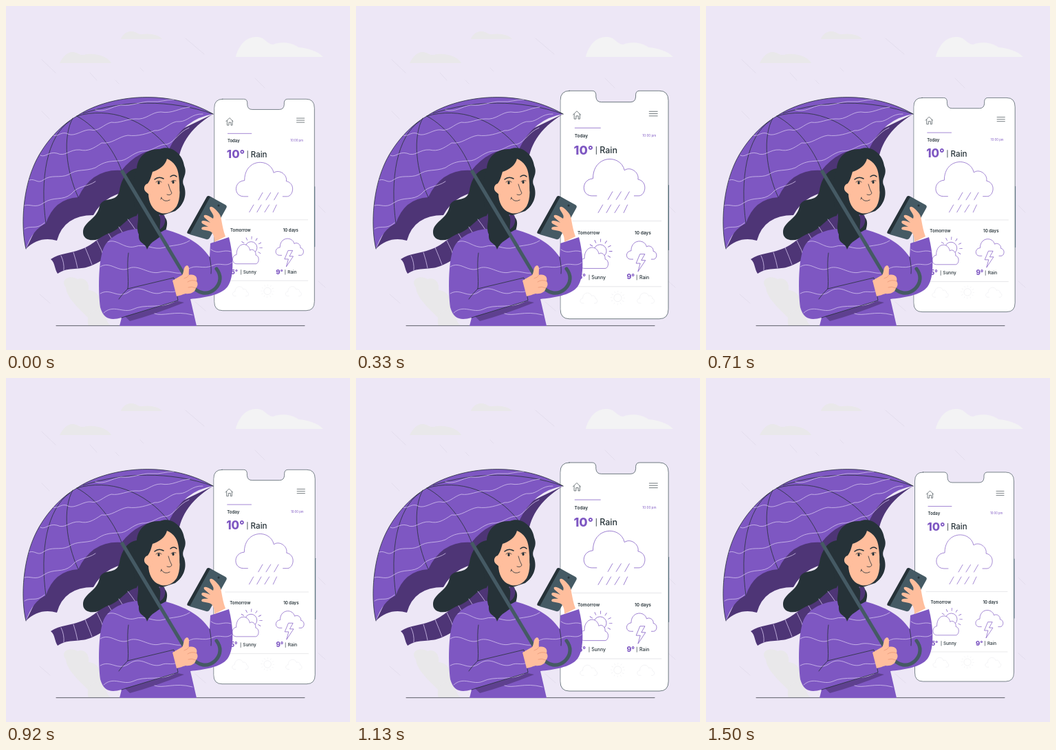
Animation of 500 by 500 pixels, one loop 1.54 s. Source, as an HTML page:

```html
<!DOCTYPE html>
<html lang="en">
<head>
<meta charset="utf-8">
<title>Rain forecast</title>
<style>
  html, body { margin: 0; width: 100%; height: 100%; overflow: hidden; background: #ede7f6; }
  svg { display: block; width: 100vw; height: 100vh; }
  path, line { stroke-linecap: round; stroke-linejoin: round; }
  text { font-family: Inter, "Open Sans", sans-serif; fill: #263238; }
  .p { fill: #7e57c2; }
  .d { fill: #4e3576; }
  .ink { fill: #263238; }
  .skin { fill: #ffbe9d; }
  .line { fill: none; stroke: #263238; stroke-width: .8; }
  .wave { fill: none; stroke: #d3c3ee; stroke-width: .8; }
  .thin { fill: none; stroke: #7e57c2; stroke-width: .7; }
  .pole { fill: none; stroke: #455a64; stroke-width: 5.2; }
  .b { font-weight: 600; font-size: 6px; }
  .num { font-weight: 800; fill: #7e57c2; }
  #app {
    transform-origin: 375.5px 289px;
    animation: beat 1540ms linear infinite;
  }
  @keyframes beat {
    0% { transform: scale(1.011); }
    17.9% { transform: scale(1.1); }
    54.9% { transform: scale(1); }
    75% { transform: scale(1.1); }
    97.4% { transform: scale(1); }
    100% { transform: scale(1.011); }
  }
</style>
</head>
<body>
<svg viewBox="0 0 500 500">
  <defs>
    <path id="cloud" d="M17 47H11C-4 47-4 25 12 24C12-8 49-9 54 13C62 7 74 16 72 25C86 28 82 47 73 47H67"/>
    <g id="sun">
      <circle r="8.5"/>
      <circle r="14" stroke-width="4.4" stroke-dasharray=".7 6.63"/>
    </g>
  </defs>

  <!-- sky -->
  <path fill="#f3f3f4" d="M334 74C337 59 349 44 364 45C377 45 378 55 388 56C400 51 416 53 425 60C438 61 454 66 461 74Z"/>
  <g fill="#e9e8ea">
    <path d="M78 83C82 75 88 67 97 67C104 67 106 72 113 71C126 67 148 72 153 83Z"/>
    <path d="M167 48C169 42 175 36 183 37C190 37 191 42 198 41C209 39 223 42 227 48Z"/>
    <path d="M130 465C118 449 88 428 87 409C78 398 92 390 104 397C116 392 122 405 120 413C132 414 139 424 137 434L150 465Z"/>
    <path d="M120 465C116 452 122 440 134 443L152 465Z"/>
  </g>
  <path fill="none" stroke="#dfd9e8" stroke-width=".7" d="M261 47L288 70M52 78L72 97M122 97L132 108M362 105L376 119M195 90L200 95M52 153L63 164M454 290L464 300M454 400L464 409M49 419L64 432M275 430L290 443M159 108L164 113"/>

  <!-- forecast app -->
  <g id="app">
    <path fill="#fff" stroke="#37474f" stroke-width=".65" d="M315.5 137H346Q350.500 137 351 142V145Q351.500 152 358 152H397Q403.500 152 404 145V142Q404.500 137 409 137H435.500Q447.500 137 447.500 150V428Q447.500 441 435.500 441H315.500Q303.500 441 303.500 428V150Q303.500 137 315.500 137Z"/>
    <path fill="none" stroke="#546e7a" d="M447.900 263V349"/>
    <path class="line" stroke-width=".6" style="stroke-width:.6" d="M320.500 169L325.500 164L330.500 169M322 168V174.500H324.500V170.500H327.500V174.500H329.500V168M422 164.500H433M422 167.500H433M422 170.500H433"/>
    <path class="thin" d="M323 186.500H357"/>
    <text class="b" x="322.500" y="199">Today</text>
    <text x="413" y="198.500" font-size="4.200" style="fill:#7e57c2">10:00 pm</text>
    <text class="num" x="321.500" y="222" font-size="16.300">10°</text>
    <path class="line" d="M351.500 211.500V221.500"/>
    <text x="356" y="220.500" font-size="11.400" font-weight="500">Rain</text>

    <use href="#cloud" class="thin" x="335" y="230"/>
    <path class="thin" d="M373 271.500L367 282M384.500 271.500L378 282M395.500 271.500L389.500 282M360 289L354 299.500M371 289L365 299.500M382.500 289L376 299.500M393 289L388 299.500"/>
    <path fill="none" stroke="#d9d9dd" stroke-width=".6" d="M320 310.500H438M320 398H438"/>

    <text class="b" x="326.500" y="328">Tomorrow</text>
    <text class="b" x="402.500" y="328">10 days</text>
    <use href="#sun" class="thin" x="356.500" y="350.500"/>
    <g transform="translate(330 347) scale(.46 .57)">
      <use href="#cloud" fill="#fff"/>
      <path class="thin" style="stroke-width:1.300" d="M11 47C-4 47-4 25 12 24C12-8 49-9 54 13C62 7 74 16 72 25C86 28 82 47 73 47Z"/>
    </g>
    <g transform="translate(392 338.500) scale(.49)">
      <use href="#cloud" class="thin" style="stroke-width:1.400"/>
    </g>
    <path class="thin" fill="#fff" style="fill:#fff" d="M409.500 355L404.500 367H410L407 378L417 363H411.500L416 355Z"/>
    <text class="num" x="323" y="388.500" font-size="9.500">15°</text>
    <text class="num" x="392" y="388.500" font-size="9.500">9°</text>
    <path class="line" style="stroke-width:.6" d="M342 382.500V389M405.500 382.500V389"/>
    <text x="345" y="388" font-size="6.300" font-weight="500">Sunny</text>
    <text x="409" y="388" font-size="6.300" font-weight="500">Rain</text>
    <g fill="none" stroke="#ececef">
      <g stroke-width="2"><use href="#cloud" transform="translate(330 407) scale(.28)"/></g>
      <use href="#sun" transform="translate(380 413) scale(.6)"/>
      <g stroke-width="2"><use href="#cloud" transform="translate(406 407) scale(.28)"/></g>
    </g>
  </g>

  <path fill="none" stroke="#777782" stroke-width="1.100" d="M73 464.600H434"/>

  <!-- umbrella -->
  <path class="d" d="M29 353Q48 334 74 341Q84 304 127 304Q142 276 175 270L250 232C251 205 266 178 301 157L170 220L60 290Z"/>
  <path class="p" d="M29 353C22 325 23 273 40 233C53 202 78 174 103 160C144 132 232 117 301 157Q258 164 237 208Q196 204 168 239Q125 236 105 278Q70 280 58 316Q39 324 29 353Z"/>
  <path class="line" d="M29 353C22 325 23 273 40 233C53 202 78 174 103 160C144 132 232 117 301 157M103 160C150 146 202 164 237 208M103 160C131 175 156 207 168 239M97 163C82 190 87 239 105 278M93 167C59 190 49 252 58 316M112 156C170 137 238 135 301 157"/>
  <g class="wave">
    <path d="M69 188C76 190 79 183 88 185C99 192 111 179 123 180C134 183 142 172 153 169C165 171 176 164 188 164C204 166 211 154 225 154C242 157 252 148 267 147"/>
    <path d="M50 217C57 221 62 211 74 214C86 220 92 208 107 209C119 212 127 207 139 199C154 201 163 190 177 188C192 190 207 185 216 181C228 183 240 166 252 168C264 168 270 156 286 157"/>
    <path d="M34 253C42 250 46 259 54 253C66 244 78 251 91 245C104 236 114 241 130 235C143 226 149 226 163 225C176 226 183 213 198 211C213 212 222 200 234 201C246 197 250 184 266 177"/>
    <path d="M27 290C35 287 43 295 55 286C70 276 82 284 95 273C106 260 117 264 130 255"/>
    <path d="M27 324C36 318 44 326 56 315M130 151C145 155 153 146 167 144C184 146 196 138 212 139C224 140 232 136 244 136"/>
  </g>

  <!-- hair behind -->
  <path class="ink" d="M190 236C191 219 205 207 224 208C238 202 256 213 259 232C265 247 253 250 259 262C264 278 256 291 246 298L228 304C240 314 231 324 230 338C225 346 214 338 207 355C201 345 188 351 192 334C174 323 164 340 144 334C130 344 112 342 112 329C112 313 132 311 136 291C141 275 161 288 165 268C168 251 176 238 190 236Z"/>

  <!-- scarf tail -->
  <path class="d" d="M190 305C173 309 167 324 151 330C133 336 127 348 108 354C92 360 79 359 65 368C72 374 70 382 75 389C91 378 108 385 125 377C145 369 154 356 174 349C188 345 199 333 206 322Z"/>
  <path class="wave" d="M80 363Q85 373 84 384M98 358Q102 370 104 381M115 351Q121 365 125 376M132 341Q140 355 143 368M149 331Q158 345 162 356M164 321Q174 336 179 347M177 310Q189 325 195 337"/>

  <!-- sweater -->
  <path class="p" d="M190 324C167 326 147 337 141 354C134 375 134 414 137 438C142 456 153 457 168 453L165 465H277L268 426C286 424 312 421 322 408C333 393 330 359 324 336L297 345L296 365C281 343 260 333 232 325Q211 338 190 324Z"/>
  <path class="d" d="M173 451L250 429L259 431Q214 449 180 458Z" opacity=".65"/>
  <g class="wave">
    <path d="M148 343C160 337 171 353 186 350C204 344 214 356 230 351C242 347 254 349 267 341"/>
    <path d="M137 379C151 370 162 387 177 382C192 374 207 391 223 387C240 382 252 395 264 383C276 374 286 384 301 377C310 372 320 380 328 373"/>
    <path d="M137 418C152 409 161 426 178 416C197 402 208 422 225 417C234 413 240 418 248 414"/>
    <path d="M142 446C156 433 170 447 184 441C202 432 223 441 244 430M216 447C228 452 245 442 271 449M298 354C309 362 315 353 327 357"/>
  </g>
  <path class="line" d="M178 359C175 379 179 398 177 411M177 411L244 395L250 428L168 453M177 411Q168 420 164 426M296 365Q299 380 298 389"/>

  <!-- neck and face -->
  <path class="d" d="M194 299C207 293 215 305 230 304C234 314 229 325 216 328C202 331 189 324 189 315C188 308 190 302 194 299Z"/>
  <path class="wave" d="M202 298Q194 310 200 326M213 302Q204 314 211 328M223 304Q217 316 220 327"/>
  <path class="skin" d="M207 272C199 270 199 260 206 258C210 253 211 247 213 241C223 238 232 231 234 222C244 226 250 235 251 247C253 264 254 280 248 291C242 300 232 304 223 300C213 297 207 285 207 272Z"/>
  <path class="ink" d="M235 222C227 221 213 228 210 244C206 251 202 257 200 266C201 283 212 295 222 303C228 312 220 323 226 333C218 342 212 340 205 354C203 343 192 347 193 332C187 318 198 306 187 292C184 268 183 250 193 231C201 213 222 206 237 216Z"/>
  <path class="skin" d="M211 260C204 256 200 264 204 270C207 275 212 275 213 271Z"/>
  <path class="line" style="stroke-width:1.500" d="M216 252Q222 247 229 251M239 248Q244 244 248 248"/>
  <ellipse class="ink" cx="222" cy="257" rx="1.600" ry="2.200"/>
  <ellipse class="ink" cx="243" cy="256" rx="1.600" ry="2.200"/>
  <path class="line" d="M218 256Q222 252 226 256M240 255Q243 252 247 254M236 259Q238 267 241 272Q239 276 234 274M226 279Q230 286 238 282M226 278L225 281"/>
  <path class="line" d="M250 238C260 251 247 264 256 275C260 284 253 292 247 296"/>

  <!-- umbrella handle -->
  <path class="pole" style="stroke-linecap:butt" d="M168 239L261 394"/>
  <path class="pole" d="M268 404C279 419 293 421 304 411C313 402 313 391 306 382"/>
  <path class="skin" d="M242 399L256 391C259 388 257 379 263 377C268 378 265 386 266 391C274 389 279 394 277 400C280 404 278 408 276 410C275 416 268 419 261 418C255 420 252 421 248 422Z"/>
  <path class="line" style="stroke:#e08a6c;stroke-width:.6" d="M277 400Q270 397 264 401M276 410Q270 407 265 409M266 391Q264 395 259 396"/>

  <!-- phone in hand -->
  <path class="ink" d="M292 277Q294 275 297 277L320 291L294 338L265 331Q262 330 264 327Z"/>
  <path fill="#455a64" d="M297 277L319 289Q322 291 320 294L296 337Q294 340 291 339L267 332Z"/>
  <circle class="ink" cx="309" cy="290" r="1.500"/>
  <path class="skin" d="M296 293C299 289 305 296 310 302C314 307 313 319 319 335L303 343C303 335 301 328 295 327L285 325C282 321 288 320 294 321L285 316C282 311 289 311 297 315L288 307C286 302 292 303 301 309C304 303 296 299 296 293Z"/>
</svg>
</body>
</html>
```
